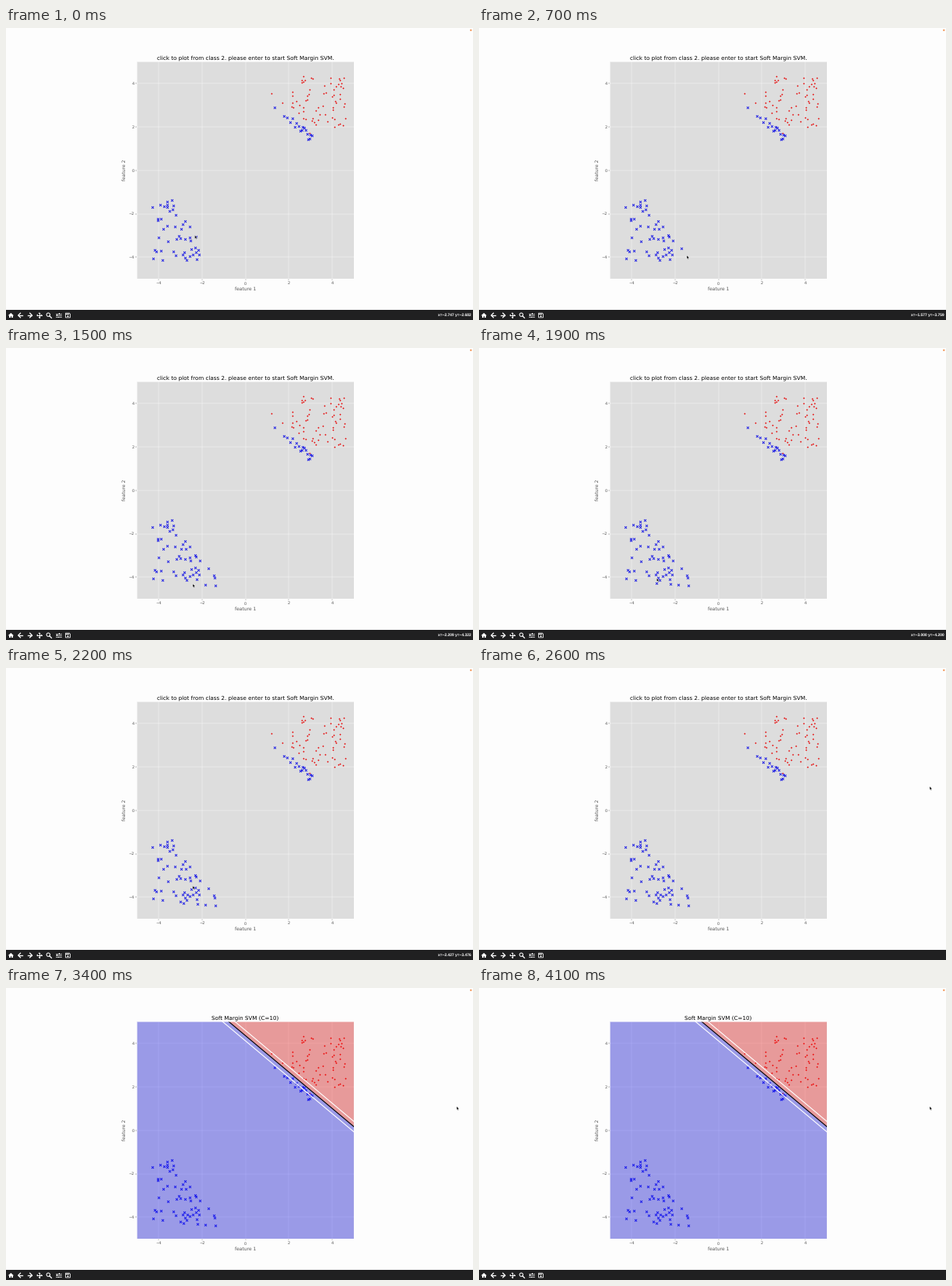
Recreate the animation shown at these times as a matplotlib script. Size 600 by 375 pixels, loop 4400 ms.

```python
import random
import numpy as np
import matplotlib.pyplot as plt
from matplotlib.animation import FuncAnimation
from matplotlib.patches import Circle, Polygon, Rectangle

W, H, DPI = 600, 375, 100
FRAMES, STEP = 44, 100
SOLVED = 34                      # step at which the classifier appears
LEFT, TOP, SIDE = 168.15, 43.45, 278.7
UNIT = SIDE / 10
SLOPE, OFFSET, MARGIN = -0.839, 4.368, 0.24
GREY, BAR, PAPER = "#555555", "#202021", "#fdfdfd"


def pt(px):
    return px * 72 / DPI


def to_stage(x, y):
    return LEFT + (x + 5) * UNIT, TOP + (5 - y) * UNIT


def boundary(x):
    return OFFSET + SLOPE * x


def sample(n, xlim, ylim, keep, gap=0.07):
    """Random points inside a box that pass keep and stay apart."""
    points = []
    while len(points) < n:
        x, y = rng.uniform(*xlim), rng.uniform(*ylim)
        if keep(x, y) and all(np.hypot(x - a, y - b) > gap for a, b in points):
            points.append((x, y))
    return points


# Samples: two separate clouds and a blue band hugging the boundary
rng = random.Random(4)
red = sample(66, (2.05, 4.6), (1.9, 4.35), lambda x, y: y > boundary(x) + 0.15)
red += [(1.2, 3.54), (1.7, 3.1), (2.95, 1.72)]
blue = sample(49, (-4.3, -2.05), (-4.15, -1.2), lambda x, y: y + 1.38 * x < -6)
blue += [(x, boundary(x) - rng.uniform(0, 0.5))
         for x in 1.35 + 1.7 * np.sqrt(np.linspace(0, 1, 18))]

# Pointer stops: step, x, y. Each click adds a sample two steps later.
CLICKS = [
    (-1, -2.747, -2.682), (0, -2.33, -2.99), (2, -2.1, -3.25),
    (5, -1.7, -3.6), (7, -1.453, -3.918), (8, -1.435, -4.03),
    (9, -1.38, -4.39), (11, -1.85, -4.36), (14, -2.209, -4.322),
    (17, -2.85, -4.28), (18, -3.0, -4.2), (20, -2.68, -3.89),
]
EXIT = [(21, -2.427, -3.476), (22, -2.427, -3.476), (24, 7.55, 0.53),
        (26, 9.742, 1.105)]
TIMES, XS, YS = np.transpose(CLICKS + EXIT)


def pointer_at(step):
    return np.interp(step, TIMES, XS), np.interp(step, TIMES, YS)


plt.rcParams.update({"font.family": "DejaVu Sans", "text.hinting": "none"})
fig = plt.figure(figsize=(W / DPI, H / DPI), dpi=DPI, facecolor=PAPER)

# Plot
ax = fig.add_axes([LEFT / W, 1 - (TOP + SIDE) / H, SIDE / W, SIDE / H],
                  facecolor="#dddddd")
ticks = range(-4, 5, 2)
ax.set(xlim=(-5, 5), ylim=(-5, 5), xticks=ticks, yticks=ticks)
ax.set_axisbelow(True)
ax.grid(color="white", lw=pt(0.4))
ax.tick_params(color=GREY, labelcolor=GREY, labelsize=pt(5), length=pt(1.75),
               width=pt(0.4), pad=pt(1.75))
for side in ax.spines.values():
    side.set(color="white", linewidth=pt(0.5))
label = dict(color=GREY, size=pt(6), labelpad=pt(2))
ax.set_xlabel("feature 1", **label)
ax.set_ylabel("feature 2", **label)
title = ax.set_title("", size=pt(7.2), pad=pt(3), color="black")

ax.scatter(*zip(*red), s=pt(1.8) ** 2, c="#e60000", lw=0, zorder=1)
crosses = ax.scatter([], [], s=pt(3) ** 2, c="#0000e6", marker="x",
                     lw=pt(0.75), zorder=1)

# Decision regions, boundary and margins
ends = np.array([-5, 5])
edge = boundary(ends)
solution = [ax.fill_between(ends, limit, edge, color=color, alpha=0.3, lw=0,
                            zorder=1.5)
            for limit, color in ((-5, "blue"), (15, "red"))]
for shift, color in ((-MARGIN, "white"), (MARGIN, "white"), (0, "black")):
    solution += ax.plot(ends, edge + shift, color=color, lw=pt(1.1), zorder=2)

# Window: toolbar, indicator, pointer
win = fig.add_axes([0, 0, 1, 1])
win.set(xlim=(0, W), ylim=(H, 0))
win.axis("off")


def shape(points, color="white"):
    win.add_patch(Polygon(points, fc=color, lw=0))


def box(x, y, w, h, color="white"):
    win.add_patch(Rectangle((x, y), w, h, fc=color, lw=0))


def dot(x, y, r, color="white"):
    win.add_patch(Circle((x, y), r, fc=color, lw=0))


def stroke(xs, ys, width=1):
    win.plot(xs, ys, color="white", lw=pt(width))


def home(x, y):
    shape([(x - 3.7, y + 0.3), (x, y - 3.1), (x + 3.7, y + 0.3)])
    box(x - 2.6, y, 5.2, 3)
    box(x - 0.7, y + 1, 1.4, 2, BAR)


def arrow(x, y, d):
    stroke([x - 2.8 * d, x + 2.6 * d], [y, y], 1.3)
    stroke([x, x + 2.8 * d, x], [y - 2.8, y, y + 2.8], 1.3)


def back(x, y):
    arrow(x, y, -1)


def forward(x, y):
    arrow(x, y, 1)


def move(x, y):
    stroke([x - 3, x + 3], [y, y])
    stroke([x, x], [y - 3, y + 3])
    for dx, dy in ((1, 0), (-1, 0), (0, 1), (0, -1)):
        shape([(x + 3.8 * dx, y + 3.8 * dy),
               (x + 2.1 * dx + 1.5 * dy, y + 2.1 * dy + 1.5 * dx),
               (x + 2.1 * dx - 1.5 * dy, y + 2.1 * dy - 1.5 * dx)])


def zoom(x, y):
    win.add_patch(Circle((x - 0.8, y - 0.8), 2.2, fc="none", ec="white", lw=pt(1)))
    stroke([x + 0.9, x + 3.3], [y + 0.9, y + 3.3], 1.3)


def sliders(x, y):
    for dy, knob in ((-2.4, 1.2), (0, -1.5), (2.4, 0.4)):
        stroke([x - 3.2, x + 3.2], [y + dy, y + dy], 0.7)
        box(x + knob - 0.4, y + dy - 0.9, 0.8, 1.8)


def save(x, y):
    win.add_patch(Polygon([(x - 2.9, y - 2.9), (x + 1.7, y - 2.9), (x + 2.9, y - 1.7),
                           (x + 2.9, y + 2.9), (x - 2.9, y + 2.9)],
                          fc=BAR, ec="white", lw=pt(0.8)))
    box(x - 2, y - 1.9, 3.2, 1.3)
    dot(x, y + 1.1, 1)


box(0, 362, W, 13, BAR)
dot(597.3, 2.8, 1.2, "#f39a5f")
for k, icon in enumerate((home, back, forward, move, zoom, sliders, save)):
    icon(6.3 + 12.2 * k, 369)

readout = win.text(598, 370.3, "", color="white", size=pt(4.9), ha="right",
                   family="Liberation Sans", weight="bold")
ARROW = np.array([(0, 0), (0, 4.5), (1, 3.6), (1.7, 5.2), (2.5, 4.9),
                  (1.8, 3.3), (3.2, 3.2)])
pointer = win.add_patch(Polygon(ARROW, fc="black", ec="white", lw=pt(0.35)))


def update(i):
    crosses.set_offsets(blue + [(x, y) for step, x, y in CLICKS if step + 2 <= i])
    pointer.set_xy(ARROW + to_stage(*pointer_at(i)))

    # The readout trails the pointer by one step
    x, y = pointer_at(i - 1)
    text = f"x={x:.3f} y={y:.3f}".replace("-", "\u2212")
    readout.set_text(text if max(abs(x), abs(y)) < 5 else "")

    solved = i >= SOLVED
    for artist in solution:
        artist.set_visible(solved)
    title.set_text("Soft Margin SVM (C=10)" if solved else
                   "click to plot from class 2. please enter to start Soft Margin SVM.")


anim = FuncAnimation(fig, update, frames=FRAMES, interval=STEP,
                     init_func=lambda: update(0), repeat=True, repeat_delay=0)
plt.show()
```
